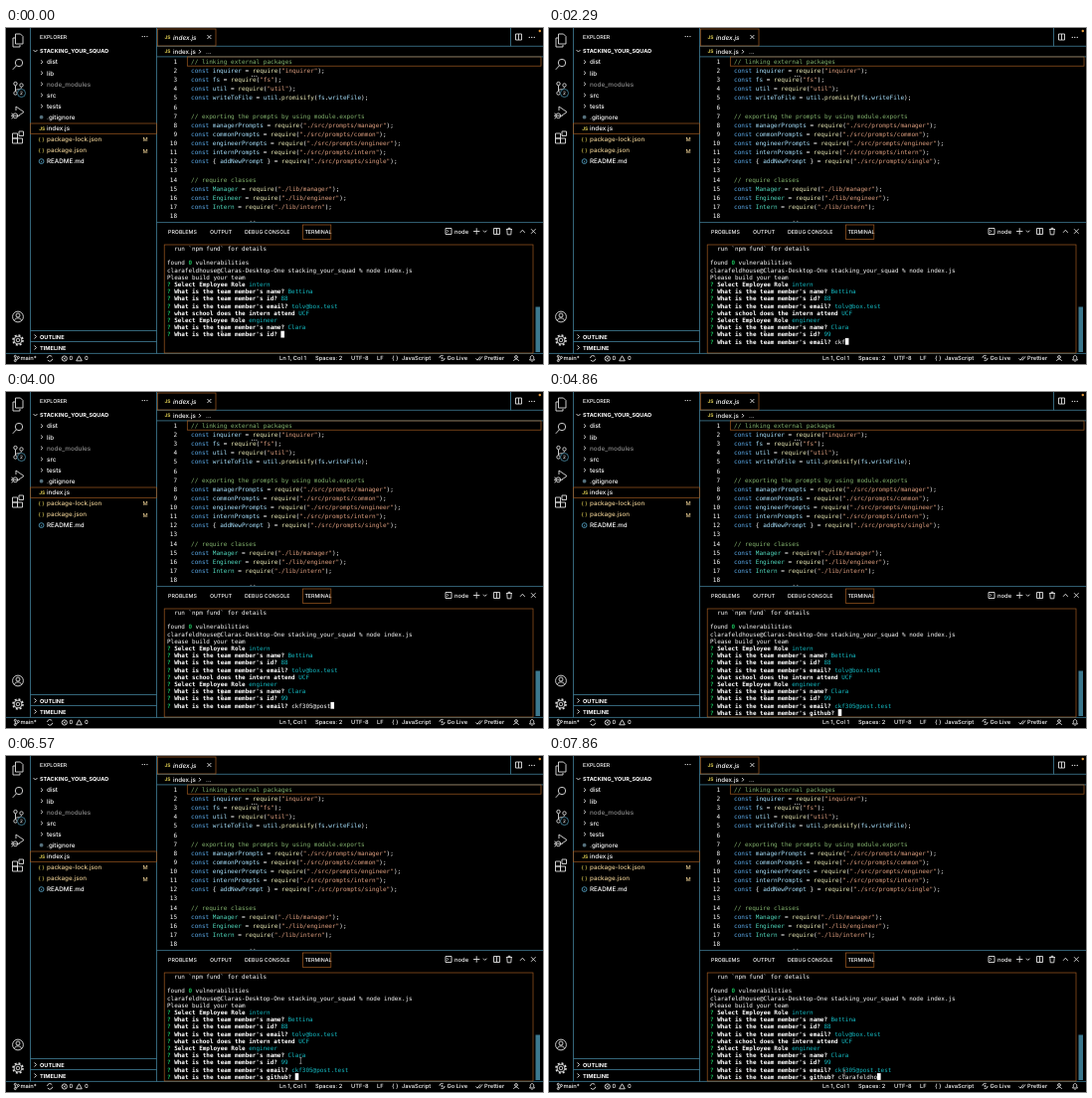
An HTML page for the animation above (8000 ms loop, 540 by 338 pixels).

```html
<!DOCTYPE html>
<html lang="en">
<head>
<meta charset="utf-8">
<title>Terminal prompt session</title>
<style>
  html, body { margin: 0; width: 100%; height: 100%; overflow: hidden; background: #000; }
  svg { display: block; width: 100vw; height: 100vh; }
  text { white-space: pre; text-rendering: geometricPrecision; font-family: Inter, "Open Sans", sans-serif; font-weight: 500; fill: #fff; }
  .mono { font-family: "DejaVu Sans Mono", monospace; }
  .icon { fill: none; stroke: #e0e0e0; stroke-width: .9; stroke-linejoin: round; }
</style>
</head>
<body>
<svg id="stage" viewBox="0 0 540 338"></svg>
<script>
const LOOP = 8000;
const stage = document.getElementById('stage');
const ORANGE = '#a05a20', EDGE = '#427f98', CYAN = '#14bcc4', GREEN = '#18bf5a', TAN = '#e6ca90', YELLOW = '#dfce52', WHITE = '#fff';

function add(tag, attrs, parent = stage) {
  const el = document.createElementNS('http://www.w3.org/2000/svg', tag);
  for (const k in attrs) el.setAttribute(k, attrs[k]);
  parent.appendChild(el);
  return el;
}
// Text is placed by its vertical middle.
function label(str, x, mid, size, attrs = {}) {
  const el = add('text', { x, y: mid + size * .36, 'font-size': size, ...attrs });
  el.textContent = str;
  return el;
}
function span(el, str, fill, bold) {
  const s = add('tspan', { fill, style: `font-weight:${bold ? 700 : 400}` }, el);
  s.textContent = str;
  return s;
}
const rect = (x, y, width, height, attrs) => add('rect', { x, y, width, height, ...attrs });
const box = (x, y, w, h) => rect(x, y, w, h, { fill: 'none', stroke: ORANGE, 'stroke-width': .7 });
const path = (d, attrs = {}) => add('path', { d, class: 'icon', ...attrs });
const ring = (cx, cy, r, attrs = {}) => add('circle', { cx, cy, r, class: 'icon', ...attrs });
const edge = d => path(d, { style: `stroke:${EDGE};stroke-width:.8` });
const bold = { style: 'font-weight:700' };
const fill = color => ({ style: `fill:${color}` });
const jsIcon = (x, y) => label('JS', x, y, 4.9, { style: `font-weight:700;fill:${YELLOW}` });

function drawFrame() {
  rect(0, 0, 540, 338, { fill: '#000' });
  edge('M24.5 0V327.5M151.5 0V327.5M24.5 304.5H151.5M24.5 315.5H151.5M151.5 195.6H540M0 327.4H540');
  edge('M151.5 18.3H540M507.5 0V18.3M151.5 28.9H540');
}

function drawActivityBar() {
  path('M9 10H7v9h7v-2M9.5 6h5l2.5 2.5V16H9.5z');
  ring(13, 35, 3.7);
  path('M10.4 37.8L6.8 41.8');
  ring(9.5, 56, 1.7);
  ring(9.5, 65.5, 1.7);
  ring(15.5, 57.5, 1.7);
  path('M9.5 58v5.5M15.5 59.5c0 3.5-6 1-6 4');
  ring(15.5, 65.5, 4, { style: `fill:#000;stroke:${EDGE}` });
  label('2', 15.5, 65.5, 4.6, { 'text-anchor': 'middle' });
  path('M10 83v-4l8 5.5-5 3.5');
  ring(9.3, 88.3, 2.4);
  path('M5.5 86l1.5 1M5.5 91l1.5-1M5 88.3h8.5');
  path('M6.5 106h5v5h-5zM6.5 111h5v5h-5zM11.5 111h5v5h-5zM13 104h4.5v4.5H13z');
  ring(12, 290.5, 5.4);
  ring(12, 289, 2);
  path('M8.3 294.5c1-3.6 6.4-3.6 7.4 0');
  ring(12, 314, 1.8);
  ring(12, 314, 3.9);
  ring(12, 314, 5, { 'stroke-dasharray': '1.96', style: 'stroke-width:1.6' });
}

function drawSidebar() {
  label('EXPLORER', 34, 8.7, 5.3);
  label('···', 136, 8.5, 7, bold);
  path('M27.5 22l2 2 2-2');
  label('STACKING_YOUR_SQUAD', 34, 23.2, 5.5, bold);
  const rowY = i => 34.2 + i * 11.1;
  ['dist', 'lib', 'node_modules', 'src', 'tests'].forEach((name, i) => {
    path(`M35 ${rowY(i) - 1.8}l1.9 1.8-1.9 1.8`);
    label(name, 41, rowY(i), 6.3, name === 'node_modules' ? fill('#8c8c8c') : {});
  });
  const files = ['.gitignore', 'index.js', 'package-lock.json', 'package.json', 'README.md'];
  files.forEach((name, k) => {
    const y = rowY(k + 5), changed = name.startsWith('package');
    label(name, 41, y, 6.25, changed ? fill(TAN) : {});
    if (changed) {
      label('{ }', 32.5, y, 5.2, fill(YELLOW));
      label('M', 137.5, y + .5, 5.6, fill(TAN));
    }
  });
  add('circle', { cx: 35.6, cy: rowY(5), r: 1.9, fill: '#55707c' });
  jsIcon(33.2, rowY(6));
  ring(35.6, rowY(9), 2.4, { style: 'stroke:#519aba' });
  path(`M35.6 ${rowY(9) - .4}v1.6`, { style: 'stroke:#519aba' });
  box(24.5, 96, 127, 10.3);
  [['OUTLINE', 310.5], ['TIMELINE', 321.5]].forEach(([name, y]) => {
    path(`M28.5 ${y - 2}l2 2-2 2`);
    label(name, 34, y, 5.6, bold);
  });
}

function drawEditor() {
  box(152.5, 1, 58.5, 17);
  jsIcon(159.5, 9.3);
  label('index.js', 168, 9.3, 6.4, { 'font-style': 'italic' });
  path('M202.4 7l4 4m0-4l-4 4');
  path('M512.5 6h6v6h-6zM515.5 6v6');
  label('···', 525, 9, 7.5, bold);
  add('circle', { cx: 536.8, cy: 3, r: 1.2, fill: '#e0963c' });
  jsIcon(159.5, 23.7);
  label('index.js', 168, 23.7, 6.2);
  path('M194 22l1.8 1.8-1.8 1.8');
  label('...', 201, 23.3, 6.2);
  box(182.3, 29, 355.7, 9.2);

  const req = (name, from) => `const ${name} = require("${from}");`;
  const prompt = kind => req(kind + 'Prompts', './src/prompts/' + kind);
  const cls = name => req(name, './lib/' + name.toLowerCase());
  const lines = [
    '// linking external packages',
    ...['inquirer', 'fs', 'util'].map(n => req(n, n)),
    'const writeToFile = util.promisify(fs.writeFile);', '',
    '// exporting the prompts by using module.exports',
    ...['manager', 'common', 'engineer', 'intern'].map(prompt),
    req('{ addNewPrompt }', './src/prompts/single'), '',
    '// require classes',
    ...['Manager', 'Engineer', 'Intern'].map(cls), ''
  ];
  const token = /(\/\/.*)|(".*?")|(const)\b|(\w+)(?=\()|(\b[A-Z]\w*)|(\w+)|(\W)/g;
  const colors = ['#84b46e', '#e0a080', '#5cacec', '#ececb8', '#50d8bc', '#a8e2ff', WHITE];
  lines.forEach((line, i) => {
    const y = 33.8 + i * 9.12;
    label(i + 1, 172, y, 6, { class: 'mono', 'text-anchor': 'end' });
    const el = label('', 186, y, 6.05, { class: 'mono' });
    for (const m of line.matchAll(token)) span(el, m[0], colors[m.slice(1).findIndex(Boolean)]);
  });
  path('M247 48.4h6', { 'stroke-dasharray': '1 1.2' });
  path('M245.5 194.4h1.5m2 0h1.5', { style: 'stroke:#777' });
}

function drawPanelHeader() {
  [['PROBLEMS', 163], ['OUTPUT', 205], ['DEBUG CONSOLE', 240], ['TERMINAL', 300.4]]
    .forEach(([name, x]) => label(name, x, 204.6, 5.3));
  box(298.6, 198, 28.2, 14.5);
  path('M442 201.5h6v6h-6zM443.3 203l1.4 1.4-1.4 1.4');
  label('node', 451, 204.7, 5.9);
  path('M470 204.5h6.4M473.2 201.3v6.4M480 203.7l1.7 1.7 1.7-1.7');
  path('M490.5 201.5h6v6h-6zM493.5 201.5v6');
  path('M503 202.5h6M505 202.3v-1h2v1M503.8 202.6l.4 5.2h3.6l.4-5.2');
  path('M517 205.8l2.4-2.6 2.4 2.6M528 202.2l4.6 4.6m0-4.6l-4.6 4.6');
}

function drawStatusBar() {
  ring(9.3, 330.3, 1);
  ring(9.3, 334.6, 1);
  ring(12.4, 331.4, 1);
  path('M9.3 331.3v2.3M12.4 332.4c0 1.2-2 .6-3 1.5');
  path('M41.5 332a2.6 2.6 0 0 1 4.8-1.2M46.7 332.8a2.6 2.6 0 0 1-4.8 1.2');
  ring(58.8, 332.5, 2.6);
  path('M57.8 331.5l2 2m0-2l-2 2M73.5 329.8l2.8 5h-5.6z');
  const items = [['main*', 14.5], ['0', 63.5], ['0', 79], ['Ln 1, Col 1', 275], ['Spaces: 2', 311], ['UTF-8', 347],
    ['LF', 373], ['{ }', 388], ['JavaScript', 398], ['Go Live', 443.5], ['Prettier', 481]];
  items.forEach(([str, x]) => label(str, x, 332.4, 5.75));
  ring(438.5, 332, .7);
  ring(438.5, 332, 2.6, { 'stroke-dasharray': '5 3.2' });
  path('M472.5 332.5l1.5 1.7 3-3.8M475.5 333.6l.6.6 3-3.8');
  ring(513, 331, 1.4);
  path('M510.5 335c.5-2.6 4.5-2.6 5 0');
  path('M526.5 334h5l-.8-1.2v-1.4c0-2.4-3.4-2.4-3.4 0v1.4zM528.4 335.3h1.2');
}

// Terminal grid
const CELL = 3.575, LEFT = 162, rowMid = n => 221.8 + n * 7.2;
const termRow = n => label('', LEFT, rowMid(n), 5.94, { class: 'mono' });
const member = what => `What is the team member's ${what}? `;
const every = (first, step, count) => Array.from({ length: count }, (_, i) => first + i * step);

function askRow(n, question, answer) {
  const el = termRow(n);
  span(el, '? ', GREEN, true);
  span(el, question, WHITE, true);
  return { el, answer: span(el, answer, CYAN) };
}

function drawTerminalText() {
  span(termRow(0), '  run `npm fund` for details', WHITE);
  const found = termRow(2);
  span(found, 'found ', WHITE);
  span(found, '0', GREEN, true);
  span(found, ' vulnerabilities', WHITE);
  span(termRow(3), 'clarafeldhouse@Claras-Desktop-One stacking_your_squad % node index.js', WHITE);
  span(termRow(4), 'Please build your team', WHITE);
  [['Select Employee Role ', 'intern'], [member('name'), 'Bettina'], [member('id'), '88'],
    [member('email'), 'tolv@box.test'], ['what school does the intern attend ', 'UCF'],
    ['Select Employee Role ', 'engineer'], [member('name'), 'Clara']]
    .forEach(([q, a], i) => askRow(i + 5, q, a));
}

const live = [
  { q: member('id'), text: '99', from: 0, to: 1290, keys: [570, 860] },
  { q: member('email'), text: 'ckf305@post.test', from: 1290, to: 4860,
    keys: [1860, 2000, 2290, 2430, 2570, 2710, 3290, 3430, ...every(3710, 142, 8)] },
  { q: member('github'), text: 'clarafeldho', from: 4860, to: LOOP, keys: every(7400, 43, 11) }
];

// Pointer path: time, x, y
const pointer = [[0, 217, 303], [4900, 217, 303], [5250, 247.8, 287], [5780, 295.5, 287],
  [6250, 295.5, 287], [6850, 297, 322], [7290, 297, 322], [7600, 297, 319]];
const SELECT = { from: 5250, to: 6250, x: LEFT + 24 * CELL };

function pointerAt(t) {
  const i = pointer.findIndex(p => p[0] > t);
  if (i < 0) return pointer[pointer.length - 1].slice(1);
  const [a, b] = [pointer[i - 1], pointer[i]];
  const u = (t - a[0]) / (b[0] - a[0]), e = u * u * (3 - 2 * u);
  return [a[1] + (b[1] - a[1]) * e, a[2] + (b[2] - a[2]) * e];
}

drawFrame();
drawActivityBar();
drawSidebar();
drawEditor();
drawPanelHeader();
drawStatusBar();
const selection = rect(SELECT.x, rowMid(9) - 3.6, 0, 7.2, { fill: '#9c9c9c' });
drawTerminalText();
live.forEach((p, i) => Object.assign(p, askRow(12 + i, p.q, '')));
const caret = rect(0, 0, CELL, 6.8, { fill: WHITE });
rect(532.5, 280.5, 4.5, 45.5, { fill: '#3c788e' });
box(159.2, 218, 370.8, 109);
const beam = path('M-1.2-3h2.4M0-3v6M-1.2 3h2.4', { style: 'stroke-width:.5' });

function render(t) {
  live.forEach((p, i) => {
    p.el.setAttribute('visibility', t >= p.from ? 'visible' : 'hidden');
    const count = p.keys.filter(k => k <= t).length;
    p.answer.textContent = p.text.slice(0, count);
    p.answer.setAttribute('fill', t < p.to ? WHITE : CYAN);
    if (t >= p.from && t < p.to) {
      caret.setAttribute('x', LEFT + (2 + p.q.length + count) * CELL);
      caret.setAttribute('y', rowMid(12 + i) - 3.5);
    }
  });
  const [x, y] = pointerAt(t);
  beam.setAttribute('transform', `translate(${x} ${y})`);
  const selecting = t >= SELECT.from && t < SELECT.to;
  selection.setAttribute('width', selecting ? Math.max(0, x - SELECT.x) : 0);
}

const start = performance.now();
function tick(now) {
  render(Math.max(0, now - start) % LOOP);
  requestAnimationFrame(tick);
}
render(0);
requestAnimationFrame(tick);
</script>
</body>
</html>
```
